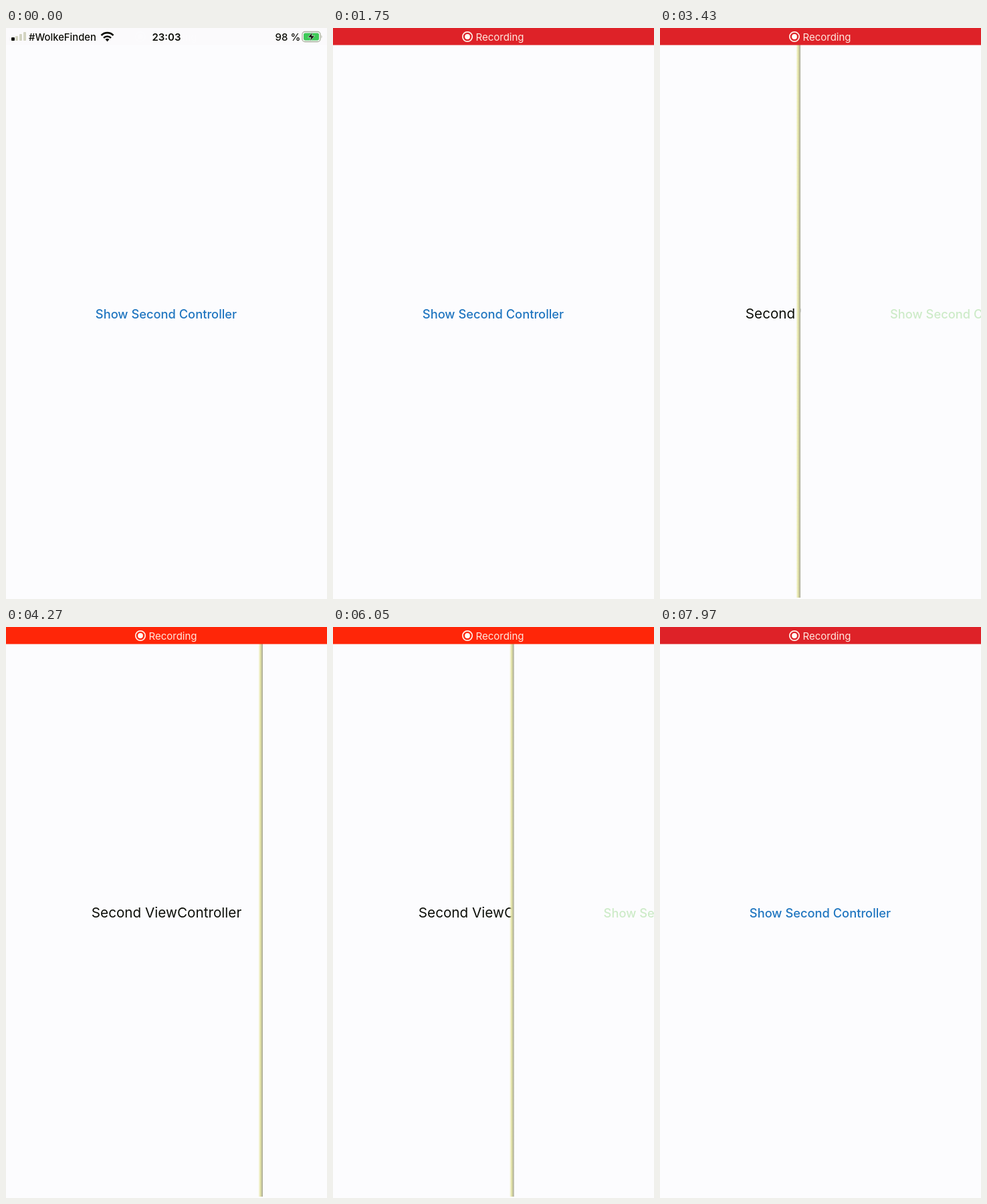
Recreate the animation shown at these times as an HTML page. Size 480 by 853 pixels, loop 7.99 s.

```html
<!DOCTYPE html>
<html lang="en">
<head>
<meta charset="utf-8">
<title>Swipe between controllers</title>
<style>
html, body { margin: 0; width: 100%; height: 100%; overflow: hidden; background: #fcfcfe; }
svg { display: block; width: 100vw; height: 100vh; font-family: Inter, Roboto, sans-serif; }
</style>
</head>
<body>
<svg viewBox="0 0 480 853" preserveAspectRatio="none">
  <defs>
    <linearGradient id="shade">
      <stop offset="0" stop-color="#eeeeb0" stop-opacity="0"/>
      <stop offset=".45" stop-color="#e4e4a4"/>
      <stop offset="1" stop-color="#a4a498"/>
    </linearGradient>
  </defs>
  <rect width="480" height="853" fill="#fcfcfe"/>
  <text x="240" y="434" font-size="20.7" text-anchor="middle" fill="#0c0e08">Second ViewController</text>

  <g id="front">
    <rect id="shadow" x="-7" y="24" width="7" height="827" fill="url(#shade)"/>
    <rect width="480" height="853" fill="#fcfcfe"/>
    <text id="button" x="239.5" y="433.5" font-size="18.3" font-weight="500" text-anchor="middle">Show Second Controller</text>
  </g>

  <g id="status" font-size="15" fill="#0c0e08">
    <rect x="8" y="14" width="5" height="5" rx="1"/>
    <g fill="#d3d6c4">
      <rect x="14" y="12" width="4" height="7" rx="1"/>
      <rect x="20" y="9" width="4" height="10" rx="1"/>
      <rect x="26" y="6" width="4" height="13" rx="1"/>
    </g>
    <text x="34" y="18.5" font-size="14.8" font-weight="500">#WolkeFinden</text>
    <g fill="none" stroke="#0c0e08" stroke-width="2.6">
      <path d="M142.5 11a12.5 12.5 0 0 1 18 0M146 14.8a7.6 7.6 0 0 1 11 0"/>
    </g>
    <path d="M151.5 20.3l-3-3.2a4.3 4.3 0 0 1 6 0z"/>
    <text x="240" y="18.5" font-weight="600" text-anchor="middle">23:03</text>
    <text x="402.5" y="18.5" font-weight="500">98 %</text>
    <rect x="443" y="5.5" width="27" height="15" rx="4" fill="none" stroke="#a9b39f" stroke-width="1.3"/>
    <rect x="445" y="7.5" width="23" height="11" rx="2.5" fill="#3ccb58"/>
    <path d="M471.5 10.5q2 2.500 0 5z" fill="#a9b39f"/>
    <path d="M458.5 6l-7 8h4.500l-1.500 6 7-8.300h-4.500z" stroke="#fcfcfe" stroke-width=".6"/>
  </g>

  <g id="recording">
    <rect id="bar" width="480" height="25.5"/>
    <circle cx="201" cy="13" r="7.2" fill="none" stroke="#fff0e8" stroke-width="1.7"/>
    <circle cx="201" cy="13" r="3.9" fill="#fffaf4"/>
    <text x="213.5" y="18.5" font-size="15" fill="#ffe8de">Recording</text>
  </g>
</svg>
<script>
const LOOP = 7990, PULSE = 1580;
// Finger drag: [time in ms, left edge of the front view]
const drag = [[2550, 0], [3430, 210], [4270, 384], [5000, 425], [6050, 271], [6850, 25], [7000, 0]];
const byId = id => document.getElementById(id);
const clamp = v => Math.max(0, Math.min(1, v));
const mix = (a, b, k) => `rgb(${a.map((v, i) => Math.round(v + (b[i] - v) * k))})`;

function slope(i) {
  const before = drag[i - 1], after = drag[i + 1];
  return before && after ? (after[1] - before[1]) / (after[0] - before[0]) : 0;
}

// Cubic Hermite curve through the drag points
function edgeAt(t) {
  const i = drag.findIndex(([time]) => time > t) - 1;
  if (i < 0) return 0;
  const [t0, x0] = drag[i], [t1, x1] = drag[i + 1];
  const span = t1 - t0, u = (t - t0) / span, v = 1 - u;
  return Math.max(0, v * v * (1 + 2 * u) * x0 + u * u * (3 - 2 * u) * x1
    + span * u * v * (v * slope(i) - u * slope(i + 1)));
}

function draw(t) {
  const edge = edgeAt(t);
  byId("front").setAttribute("transform", `translate(${edge.toFixed(2)})`);
  byId("shadow").setAttribute("opacity", edge > 0 ? 1 : 0);

  const pressed = t < 2550 ? 0 : 1 - clamp((t - 7000) / 250);
  byId("button").setAttribute("fill", mix([32, 118, 192], [205, 235, 200], pressed));

  const shown = clamp(t / 400);
  byId("recording").setAttribute("opacity", shown);
  byId("status").setAttribute("opacity", 1 - shown);

  const glow = clamp(.95 - 1.2 * Math.cos((t - 150) / PULSE * 2 * Math.PI));
  byId("bar").setAttribute("fill", mix([222, 34, 40], [255, 38, 8], glow));
}

const start = performance.now();
function frame() {
  draw((performance.now() - start) % LOOP);
  requestAnimationFrame(frame);
}
draw(0);
requestAnimationFrame(frame);
</script>
</body>
</html>
```
